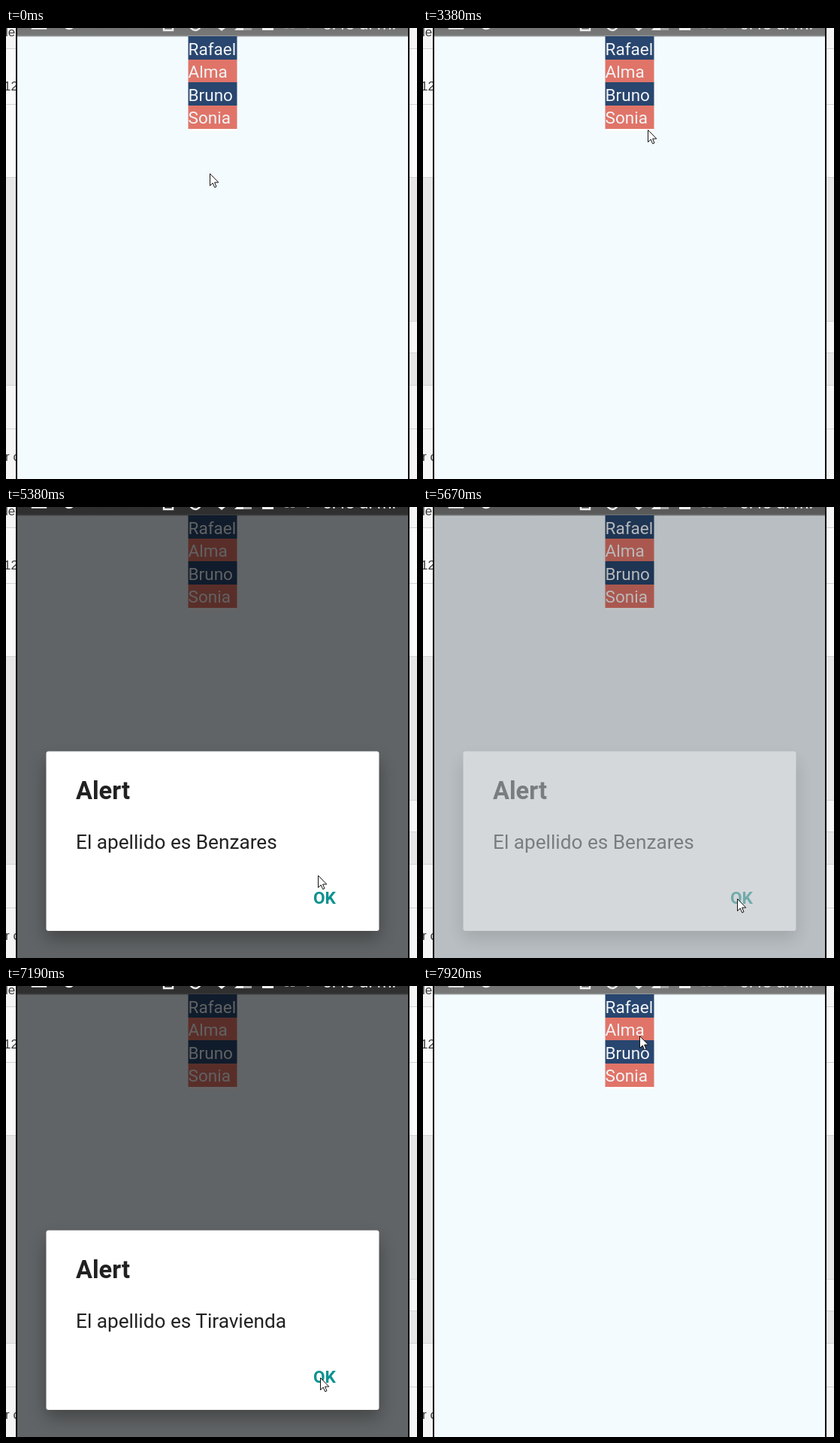
Animation of 547x599 px, one loop 8 s. Source, as an HTML page:

```html
<!DOCTYPE html>
<html lang="es">
<head>
<meta charset="utf-8">
<title>Lista con alertas</title>
<style>
  html, body { margin: 0; width: 100%; height: 100%; overflow: hidden; }
  svg { display: block; width: 547px; height: 599px; }
  text { font-family: Roboto, sans-serif; white-space: pre; }
  .page text { font: 17px Arial, "Liberation Sans", sans-serif; fill: #3a3a3a; }
  #list text { font-size: 22.5px; fill: #f3f4f6; }
  #alert text { fill: #212121; }
</style>
</head>
<body>
<svg viewBox="0 0 547 599">
  <defs>
    <linearGradient id="bar" x2="0" y2="1">
      <stop offset="0" stop-color="#747474"/>
      <stop offset=".8" stop-color="#777878"/>
      <stop offset="1" stop-color="#a3a7a8"/>
    </linearGradient>
    <filter id="soft" x="-20%" y="-20%" width="140%" height="140%">
      <feGaussianBlur stdDeviation="11"/>
    </filter>
    <clipPath id="left"><path d="M0 0H13V599H0Z"/></clipPath>
    <clipPath id="screen"><path d="M15 0H535V599H15Z"/></clipPath>
  </defs>

  <g class="page">
    <rect width="547" height="599" fill="#f5f5f6"/>
    <path d="M0 28H547V198H0Z" fill="#fafafb"/>
    <path d="M0 198H547V474H0Z" fill="#e6e6e7"/>
    <path d="M537 389H547V431H537Z" fill="#f6f6f7"/>
    <path d="M0 27.5H547M0 101.5H547M0 198.5H547M0 474.5H547M0 532.5H547M537 389.5H547M537 431.5H547" stroke="#d3d3d4"/>
    <g clip-path="url(#left)">
      <text x="-1" y="11">le</text>
      <text x="-3" y="83">12</text>
      <text x="-1" y="575">r c</text>
    </g>
  </g>

  <path d="M13 0H537V599H13Z" fill="#000"/>
  <g clip-path="url(#screen)">
    <path d="M15 0H535V599H15Z" fill="#f3fbff"/>
    <path d="M15 0H535V11.5H15Z" fill="url(#bar)"/>
    <path d="M244 133H307V137H244Z" fill="#fdfdfd"/>
    <g id="list"></g>
    <path id="dim" d="M15 0H535V599H15Z" fill="#000"/>
    <g class="status">
      <g fill="none" stroke="#eee" stroke-width="2.4">
        <path d="M35 -6V.5H53V-6M210 -6V3H222V-6"/>
        <circle cx="84" cy="-6" r="7"/>
        <circle cx="252" cy="-4" r="7"/>
      </g>
      <path d="M282 0H292L287 4ZM341 0H356V3H341ZM304 3L310 -3H316V3Z" fill="#eee"/>
      <path d="M316 -3H327V3H316Z" fill="#a5a5a5"/>
      <path d="M371 0H376V1H371ZM379 0H384V1H379ZM400 0H404V1H400Z" fill="#999"/>
      <text x="421" y="2" font-size="22.5" fill="#e6e6e6">5:48 a. m.</text>
    </g>
    <g id="alert">
      <rect x="52" y="336" width="446" height="238" rx="8" opacity=".29" filter="url(#soft)"/>
      <rect x="53.5" y="324.5" width="443" height="238.5" rx="3" fill="#fff"/>
      <text x="93" y="388" font-size="32.6" font-weight="600">Alert</text>
      <text id="message" x="93" y="454" font-size="26.2"></text>
      <text x="409" y="527" font-size="22.6" font-weight="700" style="fill:#0b9290">OK</text>
    </g>
  </g>
  <path id="cursor" d="M.5 .5V16.5L4.2 13L6.7 18.7L9 17.7L6.6 12.1H11.8Z" fill="#fff" stroke="#111"/>
</svg>
<script>
  const LOOP = 8000, TICK = 139, PHASE = 95;
  const $ = id => document.getElementById(id);
  const clamp = v => Math.min(1, Math.max(0, v));
  const ramp = (t, start, length) => clamp((t - start) / length);
  const smooth = p => p * p * (3 - 2 * p);
  const mix = (a, b, p) => a + (b - a) * p;

  const people = ["Rafael", "Alma", "Bruno", "Sonia"];
  const rowTop = i => Math.round(11.2 + i * 30.6);
  $("list").innerHTML = people.map((name, i) =>
    `<g><rect x="242.5" y="${rowTop(i)}" width="65" height="${rowTop(i + 1) - rowTop(i)}" fill="${i % 2 ? "#e07468" : "#28466f"}"/>` +
    `<text x="242.6" y="${35.6 + i * 30.6}">${name}</text></g>`).join("");
  const rows = [...$("list").children];

  // each glide eases the pointer to a spot
  const rest = { x: 271, y: 193 };
  const ok = { x: 418, y: 520 };
  const glides = [
    { from: 0, to: 500, x: 268, y: 188 },
    { from: 700, to: 1070, x: 267, y: 197 },
    { from: 2000, to: 2450, x: 246, y: 183 },
    { from: 2450, to: 2950, x: 316, y: 152 },
    { from: 2950, to: 3800, x: 286, y: 114 },
    { from: 4560, to: 5570, ...ok },
    { from: 5655, to: 5930, x: 286, y: 96 },
    { from: 6630, to: 7180, ...ok },
    { from: 7440, to: 7870, x: 288, y: 66 }
  ];

  const taps = [
    { row: 3, down: 4115, close: 5560, surname: "Benzares" },
    { row: 2, down: 6180, close: 7440, surname: "Tiravienda" }
  ];

  // x leads y, so long glides bend
  function pointer(t) {
    return glides.reduce((p, g) => {
      const k = ramp(t, g.from, g.to - g.from);
      return { x: mix(p.x, g.x, smooth(1 - (1 - k) ** 1.5)), y: mix(p.y, g.y, smooth(k) ** .8) };
    }, rest);
  }

  function draw(time) {
    const t = Math.max(0, Math.floor((time - PHASE) / TICK) * TICK + PHASE);
    const { x, y } = pointer(t);
    $("cursor").setAttribute("transform", `translate(${Math.round(x)} ${Math.round(y)})`);

    const tap = taps.findLast(a => t >= a.down) || taps[0];
    const age = t - tap.down;
    const fade = 1 - .8 * (ramp(age, 0, 150) - ramp(age, 200, 230));
    const opening = ramp(age, 255, 150);
    const left = 1 - ramp(t, tap.close, 160);
    rows.forEach((row, i) => row.setAttribute("opacity", i === tap.row ? fade : 1));
    $("dim").setAttribute("opacity", .6 * opening * left);
    $("alert").setAttribute("opacity", (1 - (1 - opening) ** 4) * left);
    $("message").textContent = "El apellido es " + tap.surname;
  }

  const start = performance.now();
  function tick() {
    draw((performance.now() - start) % LOOP);
    requestAnimationFrame(tick);
  }
  tick();
</script>
</body>
</html>
```
